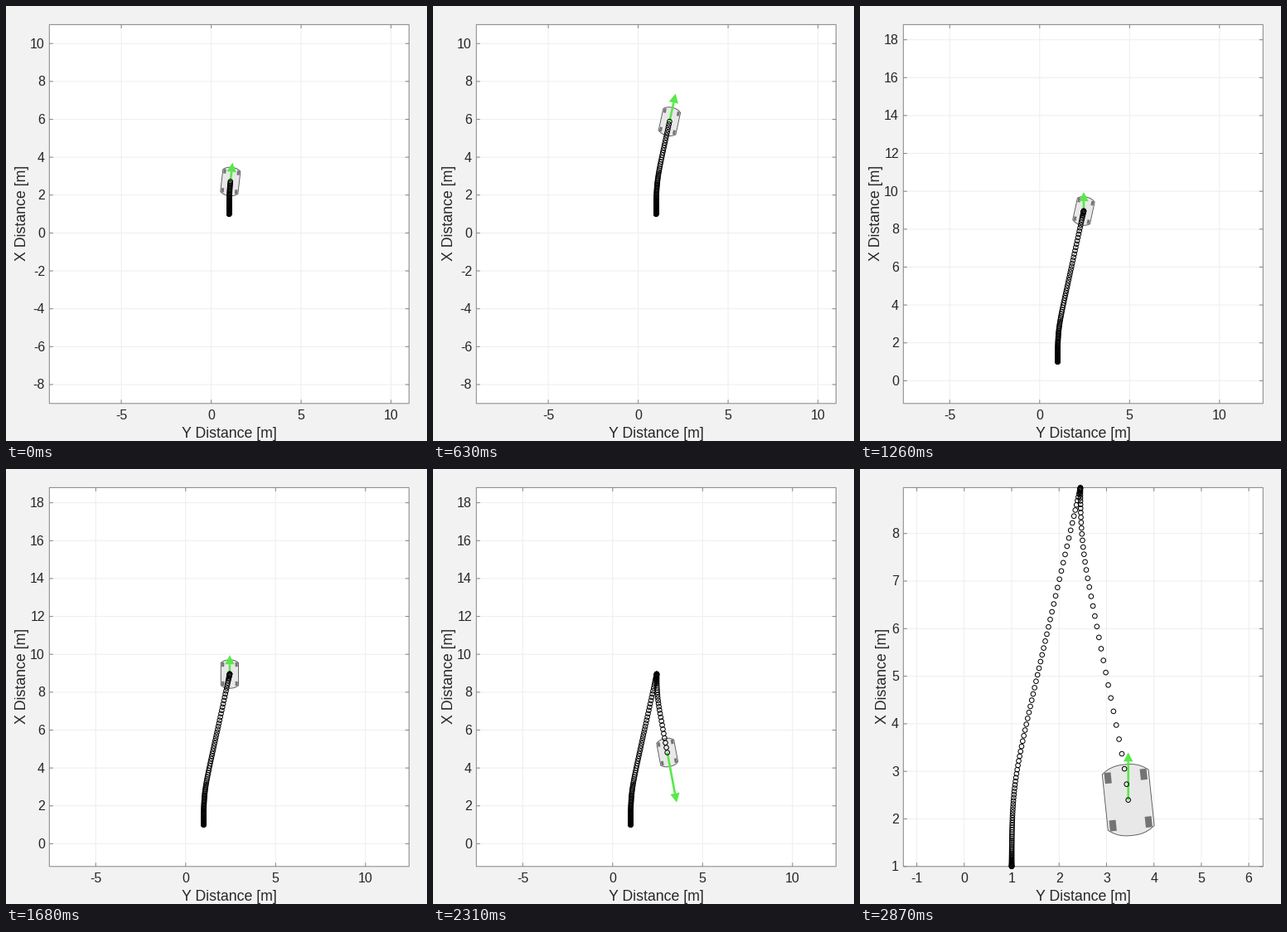
Recreate the animation shown at these times as a matplotlib script. Size 508 px wide and 524 px high, loop 3920 ms.

```python
import matplotlib.pyplot as plt
import numpy as np
from matplotlib.animation import FuncAnimation
from matplotlib.collections import EllipseCollection
from matplotlib.patches import Polygon, Rectangle

W, H, DPI = 508, 524, 100
PX = 72 / DPI                      # points per pixel
FRAMES, INTERVAL = 56, 70
LEFT, RIGHT, TOP, BOTTOM = 52.3, 486.3, 22.4, 478.8

INK, BOX, GRID = "#262626", "#858585", "#eeeeee"
GREEN = "#58e848"

plt.rcParams["font.family"] = "Liberation Sans"
fig = plt.figure(figsize=(W / DPI, H / DPI), dpi=DPI, facecolor="#f2f2f2")
ax = fig.add_axes([0, 0, 1, 1])


def drive_path():
    """Positions and lean (dx/dy) of the car: forward run, then reverse run."""
    k = np.arange(-48, 54)
    speed = np.interp(k, [-48, 0, 13, 27, 33, 39, 42, 45, 48, 53],
                      [0, .07, .122, .147, .175, .172, .145, .09, .045, 0])
    y_fwd = 1 + np.cumsum(speed)
    lean_fwd = 0.23 / (1 + np.exp((2.69 - y_fwd) / 0.41))

    y_rev = y_fwd[-1] - 0.5 * 0.00863 * np.arange(1, 40) ** 2
    lean_rev = -np.interp(y_rev, [2.4, 3.2, 4, 6.9, 8.5, 8.97],
                          [.105, .19, .202, .188, .02, 0])

    y = np.concatenate([y_fwd, y_rev])
    lean = np.concatenate([lean_fwd, lean_rev])
    x = 1 + np.cumsum(lean * np.diff(y, prepend=y[0]))
    return x, y, lean


X, Y, LEAN = drive_path()
START = 48

# x limits, y limits, x ticks, y ticks, baseline of the vertical label
VIEWS = [
    ((-9, 11), (-9, 11), range(-5, 11, 5), range(-8, 11, 2), 24),
    ((-7.58, 12.42), (-1.2, 18.8), range(-5, 11, 5), range(0, 19, 2), 24),
    ((-1.284, 6.3), (1, 8.965), range(-1, 7), range(1, 9), 32),
]


def tip_index(i):
    k = np.interp(i, [0, 17, 18, 23, 24, 29, 31, 35, 36],
                  [0, 51, 53, 53, 54, 71, 77, 91, 92])
    return START + int(round(k))


def to_px(view, x, y):
    (x0, x1), (y0, y1) = view[:2]
    px = LEFT + (np.asarray(x) - x0) / (x1 - x0) * (RIGHT - LEFT)
    py = BOTTOM - (np.asarray(y) - y0) / (y1 - y0) * (BOTTOM - TOP)
    return px, py


def line(xs, ys, color, width=1, z=1):
    ax.plot(xs, ys, color=color, lw=width * PX, zorder=z,
            solid_capstyle="butt", snap=False)


def label(x, y, text, size, ha="center", rotation=0):
    ax.text(x, y, text, size=size * PX, color=INK, ha=ha, va="baseline",
            rotation=rotation, rotation_mode="anchor")


def draw_axes(view):
    ax.add_patch(Rectangle((LEFT, TOP), RIGHT - LEFT, BOTTOM - TOP,
                           fc="white", ec="none", zorder=0, snap=False))
    ax.add_patch(Rectangle((LEFT, TOP), RIGHT - LEFT, BOTTOM - TOP,
                           fc="none", ec=BOX, lw=PX, zorder=2, snap=False))
    tick = 4.5
    for v in view[2]:
        px = float(to_px(view, v, 0)[0])
        line([px, px], [TOP, BOTTOM], GRID)
        line([px, px], [BOTTOM, BOTTOM - tick], BOX, z=2)
        line([px, px], [TOP, TOP + tick], BOX, z=2)
        label(px, 498.5, str(v), 16)
    for v in view[3]:
        py = float(to_px(view, 0, v)[1])
        line([LEFT, RIGHT], [py, py], GRID)
        line([LEFT, LEFT + tick], [py, py], BOX, z=2)
        line([RIGHT, RIGHT - tick], [py, py], BOX, z=2)
        label(47, py + 5.5, str(v), 16, ha="right")
    label(269, 520, "Y Distance [m]", 17.8)
    label(view[4], 249.8, "X Distance [m]", 17.8, rotation=90)


def draw_car(view, x, y, lean):
    angle = np.arctan(lean)
    c, s = np.cos(angle), np.sin(angle)

    def shape(side, ahead, **style):
        side, ahead = np.asarray(side), np.asarray(ahead)
        pts = to_px(view, x + side * c + ahead * s, y - side * s + ahead * c)
        ax.add_patch(Polygon(np.column_stack(pts), snap=False, **style))

    u = np.linspace(-1, 1, 25)
    bulge = 0.59 + 0.16 * (1 - np.abs(u) ** 2.5)
    shape(np.r_[u, -u] * 0.49, np.r_[bulge, -bulge],
          fc="#e8e8e8", ec="#585858", lw=0.9 * PX, zorder=3)
    for side in (-0.378, 0.378):
        for ahead in (-0.503, 0.503):
            shape(side + 0.07 * np.array([-1, 1, 1, -1]),
                  ahead + 0.115 * np.array([-1, -1, 1, 1]),
                  fc="#747474", ec="none", zorder=4)


def draw_arrow(view, x, y, vec):
    tail = np.array(to_px(view, x, y))
    tip = np.array(to_px(view, x + vec[0], y + vec[1]))
    d = (tip - tail) / np.hypot(*(tip - tail))
    n = np.array([-d[1], d[0]])
    base = tip - 11 * d
    line([tail[0], base[0]], [tail[1], base[1]], GREEN, 2.6, z=5)
    ax.add_patch(Polygon([tip, base + 5.7 * n, base - 5.7 * n],
                         fc=GREEN, ec="none", zorder=5))


def draw_trail(view, x, y):
    size = np.full(len(x), 5.6)
    ax.add_collection(EllipseCollection(
        size, size, np.zeros(len(x)), units="xy",
        offsets=np.column_stack(to_px(view, x, y)),
        offset_transform=ax.transData,
        facecolors="none", edgecolors="black", linewidths=PX, zorder=6))


def velocity(i, k):
    """Arrow in metres; it points straight up while the car stands."""
    if 18 <= i <= 24 or i >= 36:
        return np.array([0.0, 1.0])
    step = np.array([X[k] - X[k - 1], Y[k] - Y[k - 1]])
    size = np.hypot(*step)
    return step / size * max(1, 10 * size)


def draw(i):
    ax.clear()
    ax.set(xlim=(0, W), ylim=(H, 0))
    ax.axis("off")
    view = VIEWS[0 if i < 16 else 1 if i < 41 else 2]
    k = tip_index(i)
    draw_axes(view)
    draw_car(view, X[k], Y[k], LEAN[k])
    draw_arrow(view, X[k], Y[k], velocity(i, k))
    draw_trail(view, X[:k + 1], Y[:k + 1])
    return []


anim = FuncAnimation(fig, draw, frames=FRAMES, interval=INTERVAL,
                     repeat=True, repeat_delay=0)
plt.show()
```
